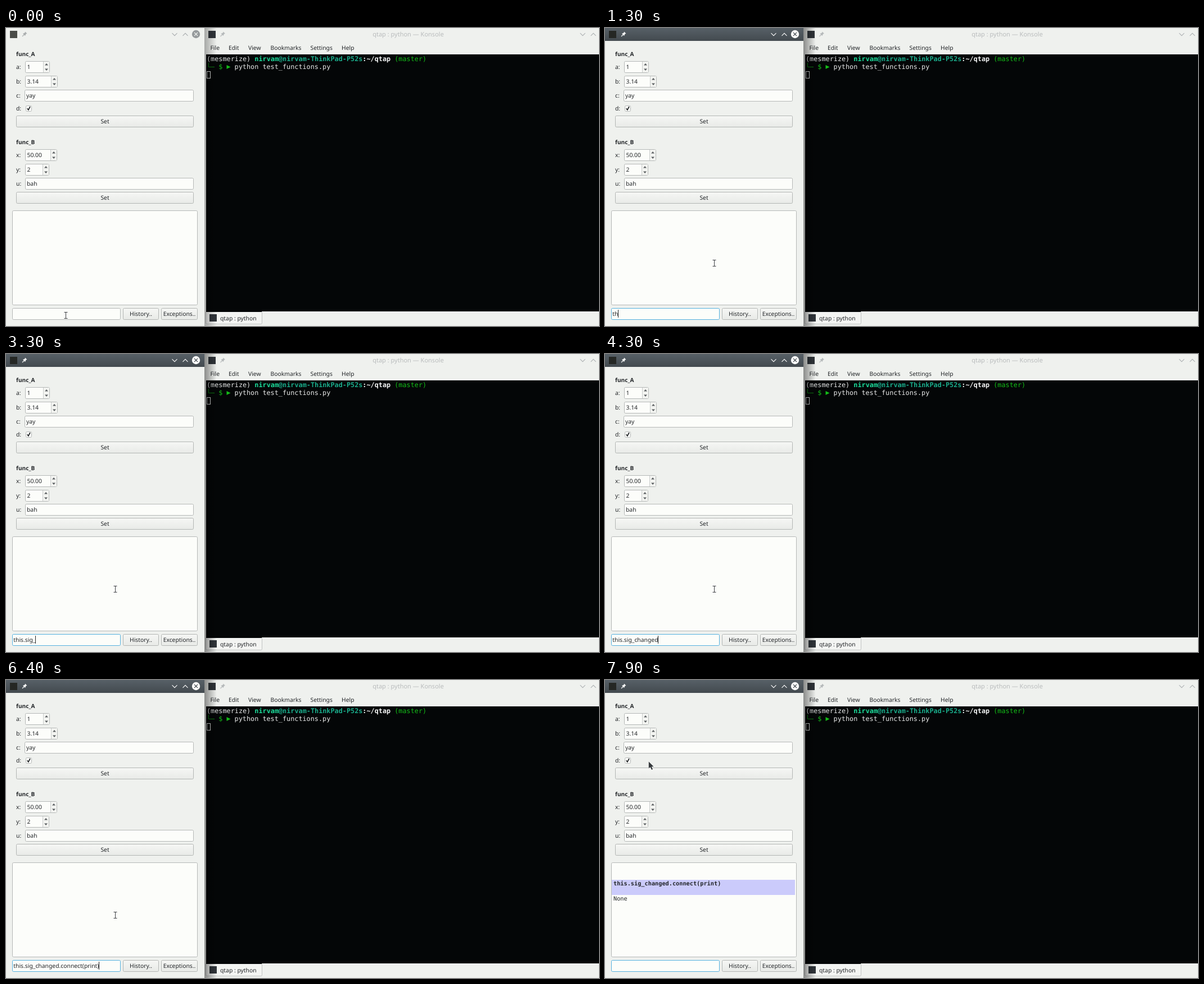
Recreate the animation shown at these times as an HTML page with a canvas. Size 1055 by 531 pixels, loop 8000 ms.

```html
<!DOCTYPE html>
<html lang="en">
<head>
<meta charset="utf-8">
<title>qtap</title>
<style>
html, body { margin: 0; width: 100%; height: 100%; overflow: hidden; background: #eff1ee; }
canvas { display: block; width: 1055px; height: 531px; }
</style>
</head>
<body>
<canvas id="stage" width="1055" height="531"></canvas>
<script>
const LOOP = 8000;
const ctx = document.getElementById('stage').getContext('2d');
const SANS = '"Noto Sans", sans-serif';
const MONO = '"DejaVu Sans Mono", monospace';
const UI = '10.35px ' + SANS;
const BOLD = 'bold 10.1px ' + SANS;
const INK = '#232629', PANEL = '#eff1ee', FIELD = '#fcfdfa', EDGE = '#b5b8b7';
const COMMAND = 'this.sig_changed.connect(print)';
const SENT = 6900;

// [time, typed length]
const typing = [
  [0, 0], [1100, 1], [1300, 2], [1400, 3], [1500, 4], [1600, 5],
  [2500, 6], [2800, 5], [2900, 6], [3000, 7], [3100, 8], [3300, 9], [3500, 10],
  [3700, 11], [3800, 12], [3900, 13], [4000, 14], [4100, 15],
  [4300, 16], [4400, 17], [4500, 18], [4600, 19], [4700, 20],
  [4900, 21], [5000, 22], [5100, 23], [5300, 24], [5600, 25], [5800, 26],
  [6000, 27], [6100, 29], [6200, 30], [6400, 31], [SENT, 0]
];
// [time, visible]
const blink = [[0, 0], [100, 1], [600, 0], [1100, 1], [2200, 0], [2500, 1], [7600, 0]];
// [time, shape, x, y]
const pointer = [
  [0, 'beam', 106, 512], [200, 'beam', 145, 469], [300, 'beam', 160, 453],
  [500, 'beam', 175, 437], [600, 'beam', 188, 425], [700, 'beam', 194, 419],
  [7600, 'none', 0, 0], [7800, 'arrow', 173, 191], [7900, 'arrow', 77, 145]
];

const at = (steps, t) => steps.filter(s => s[0] <= t).pop();

function rect(x, y, w, h, color) {
  ctx.fillStyle = color;
  ctx.fillRect(x, y, w, h);
}

function text(str, x, y, font = UI, color = INK, align = 'left') {
  ctx.font = font;
  ctx.fillStyle = color;
  ctx.textAlign = align;
  ctx.fillText(str, x, y);
}

function line(points, color, width = 1) {
  ctx.beginPath();
  points.forEach(([x, y]) => ctx.lineTo(x, y));
  ctx.strokeStyle = color;
  ctx.lineWidth = width;
  ctx.stroke();
}

function poly(points, color) {
  ctx.beginPath();
  points.forEach(([x, y]) => ctx.lineTo(x, y));
  ctx.closePath();
  ctx.fillStyle = color;
  ctx.fill();
}

function fade(x0, y0, x1, y1, from, to) {
  const g = ctx.createLinearGradient(x0, y0, x1, y1);
  g.addColorStop(0, from);
  g.addColorStop(1, to);
  return g;
}

// Rounded box between outer pixel edges
function box(x0, y0, x1, y1, fill = FIELD, edge = EDGE) {
  ctx.beginPath();
  ctx.roundRect(x0 + .5, y0 + .5, x1 - x0 - 1, y1 - y0 - 1, 2);
  ctx.fillStyle = fill;
  ctx.fill();
  ctx.strokeStyle = edge;
  ctx.lineWidth = 1;
  ctx.stroke();
}

function button(label, x0, y0, x1, y1) {
  box(x0, y0, x1, y1, fade(0, y0, 0, y1, '#f6f7f5', '#e8eae7'), '#b3b6b4');
  text(label, (x0 + x1) / 2, y0 + 14.3, UI, INK, 'center');
}

function spin(label, value, y, right, split) {
  text(label, 18, y + 14);
  box(34, y, right, y + 21);
  rect(split, y + 1, 1, 19, '#c9cccb');
  rect(split + 1, y + 1, right - split - 2, 19, '#f3f4f1');
  const c = (split + right) / 2;
  poly([[c - 3, y + 7.5], [c, y + 4], [c + 3, y + 7.5]], '#5b5f61');
  poly([[c - 3, y + 13.5], [c, y + 17], [c + 3, y + 13.5]], '#5b5f61');
  text(value, 37.5, y + 14);
}

function edit(label, value, x, y) {
  text(label, 18, y + 13.5);
  box(x, y, 334, y + 21);
  text(value, x + 3, y + 13.7);
}

function chevron(x, y, dir, color) {
  line([[x - 4.5, y - 2.3 * dir], [x, y + 2.2 * dir], [x + 4.5, y - 2.3 * dir]], color, 1.1);
}

function pin(x, y, color) {
  poly([[x + 1, y - 4.5], [x + 4.5, y - 1], [x + 2.6, y - .6], [x + 1, y + 3],
    [x - 3, y - 1], [x + .6, y - 2.6]], color);
  line([[x - 1, y + 1], [x - 4, y + 4]], color, 1.1);
}

function konsole() {
  rect(353, 0, 702, 531, PANEL);
  rect(360, 5, 13, 13, '#31363b');
  pin(385.5, 11, '#b5b9ba');
  text('qtap : python — Konsole', 715.5, 15, '11px ' + SANS, '#b9bcbd', 'center');
  chevron(1026, 11.5, 1, '#aeb2b4');
  chevron(1045, 11.5, -1, '#aeb2b4');
  [['File', 363.5], ['Edit', 396], ['View', 431], ['Bookmarks', 470.5],
    ['Settings', 541.5], ['Help', 597]].forEach(([s, x]) => text(s, x, 39));

  rect(356, 47, 699, 458, '#040607');
  const regular = '11.82px ' + MONO, bold = 'bold ' + regular;
  let x = 357;
  [['(mesmerize) ', regular, '#e8e9e9'], ['nirvam', bold, '#1cdc9a'],
    ['@nirvam-ThinkPad-P52s', bold, '#1aab8a'], [':~/qtap ', bold, '#f4f5f5'],
    ['(master)', regular, '#14bd18']].forEach(([s, font, color]) => {
    text(s, x, 58.7, font, color);
    x += ctx.measureText(s).width;
  });
  line([[360.5, 62], [360.5, 69.5], [371, 69.5]], '#0d8011');
  text('$', 378.3, 73, regular, '#14bd18');
  poly([[392.5, 66], [399.5, 69.5], [392.5, 73]], '#14bd18');
  text('python test_functions.py', 406.6, 73, regular, '#e8e9e9');
  ctx.strokeStyle = '#d8dada';
  ctx.lineWidth = 1;
  ctx.strokeRect(357.5, 77.5, 6, 12);

  box(355, 504, 456, 528, '#f3f4f2', '#c0c3c2');
  rect(356, 503, 99, 3, '#040607');
  rect(362, 510, 13, 13, '#31363b');
  text('qtap : python', 381, 521);
}

function titleBar(active) {
  const mark = active ? '#fcfcfc' : '#a9adae';
  if (active) rect(0, 0, 353, 23, fade(0, 0, 0, 23, '#576067', '#434a4f'));
  rect(7, 5, 13, 13, active ? '#252724' : '#4a4c48');
  pin(33, 11, mark);
  chevron(300, 11.5, 1, mark);
  chevron(319, 11.5, -1, mark);
  ctx.beginPath();
  ctx.arc(338, 11, 7.2, 0, Math.PI * 2);
  ctx.fillStyle = active ? '#fcfcfc' : '#969a9c';
  ctx.fill();
  const cross = active ? '#454c51' : PANEL;
  line([[335, 8], [341, 14]], cross, 1.1);
  line([[341, 8], [335, 14]], cross, 1.1);
}

function form() {
  text('func_A', 18, 50, BOLD);
  spin('a:', '1', 59, 78, 66);
  spin('b:', '3.14', 85, 92, 80);
  edit('c:', 'yay', 33, 110);
  text('d:', 18, 147);
  box(35, 138, 46, 149);
  line([[37.8, 143.3], [39.8, 146], [43, 140]], INK, 1.7);
  button('Set', 18, 156, 334, 177);
  text('func_B', 18, 206.7, BOLD);
  spin('x:', '50.00', 216, 91, 79);
  spin('y:', '2', 242, 77, 65);
  edit('u:', 'bah', 34, 267);
  button('Set', 18, 292, 334, 313);
}

function consolePane(t, active) {
  box(11, 325, 341, 494);
  if (t >= SENT) {
    const mono = '10.25px ' + MONO;
    rect(12, 356, 326, 27, '#cbcbfb');
    text(COMMAND, 15, 366.3, 'bold ' + mono);
    text('None', 15, 393.3, mono);
  }
  box(11, 499, 204, 520, FIELD, active ? '#55b1df' : EDGE);
  const typed = COMMAND.slice(0, at(typing, t)[1]);
  text(typed, 13.3, 513);
  if (at(blink, t)[1]) {
    const x = Math.floor(13.3 + ctx.measureText(typed).width);
    rect(x, 502, 1, 14, INK);
  }
  button('History..', 208, 499, 272, 520);
  button('Exceptions..', 276, 499, 341, 520);
}

function drawPointer([, shape, x, y]) {
  if (shape === 'beam') {
    [['#ffffff', 2.6], ['#3a3d3f', 1]].forEach(([color, w]) => {
      line([[x - 2.5, y - 5.5], [x + 3.5, y - 5.5]], color, w);
      line([[x + .5, y - 5.5], [x + .5, y + 5.5]], color, w);
      line([[x - 2.5, y + 5.5], [x + 3.5, y + 5.5]], color, w);
    });
  } else if (shape === 'arrow') {
    const tip = [[x + .8, y + .5], [x + .8, y + 12.5], [x + 3.6, y + 10.2],
      [x + 6, y + 15], [x + 8, y + 14], [x + 5.8, y + 9.5], [x + 9.5, y + 9.3]];
    line([...tip, tip[0]], '#f4f5f3', 1.6);
    poly(tip, '#35393c');
  }
}

function draw(t) {
  const active = t >= 100;
  ctx.textRendering = 'geometricPrecision';
  konsole();
  rect(353, 0, 22, 531, fade(353, 0, 375, 0,
    active ? 'rgba(0,0,0,.42)' : 'rgba(0,0,0,.3)', 'rgba(0,0,0,0)'));
  rect(0, 0, 353, 531, PANEL);
  titleBar(active);
  form();
  consolePane(t, active);
  drawPointer(at(pointer, t));
}

const start = performance.now();
function tick() {
  draw((performance.now() - start) % LOOP);
  requestAnimationFrame(tick);
}
tick();
</script>
</body>
</html>
```
